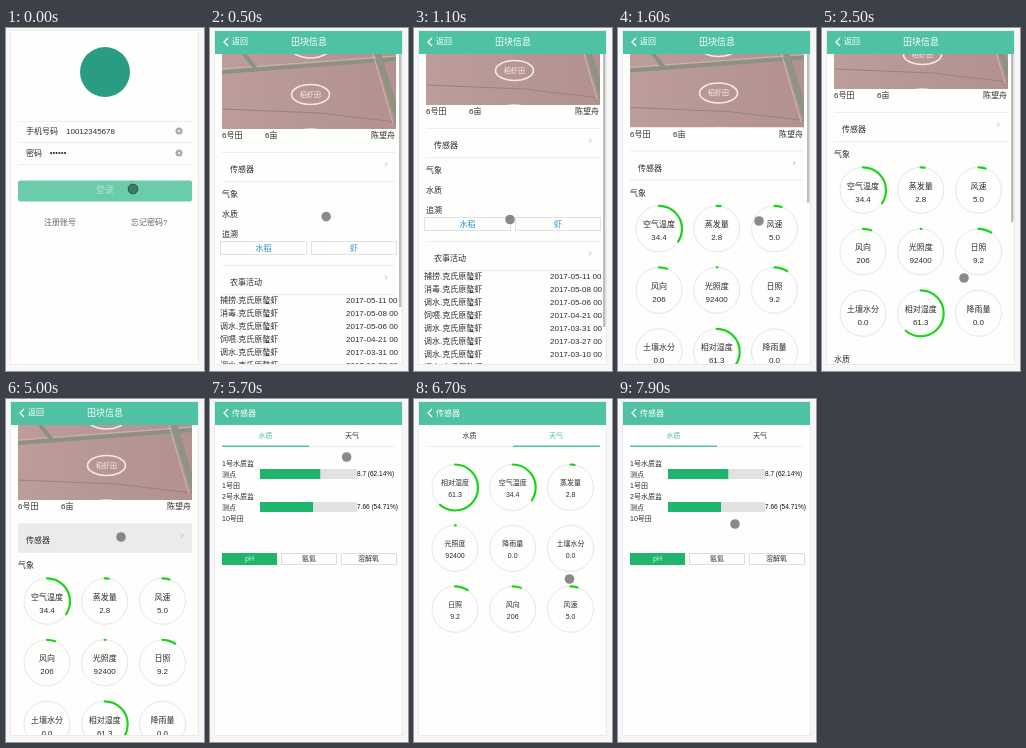
An HTML page with a canvas for the animation above (8 s loop, 198 px wide and 343 px high).

```html
<!DOCTYPE html>
<html lang="zh">
<head>
<meta charset="utf-8">
<style>
html, body { margin: 0; width: 198px; height: 343px; overflow: hidden; background: #f7f7f7; }
canvas { display: block; width: 198px; height: 343px; }
</style>
</head>
<body>
<canvas id="stage"></canvas>
<script>
const canvas = document.getElementById('stage');
const c = canvas.getContext('2d');
const dpr = window.devicePixelRatio || 1;
canvas.width = 198 * dpr;
canvas.height = 343 * dpr;

const LOOP = 8000, STEP = 100;
const TEAL = '#50c2a4', GREEN = '#1fb56c', RING = '#18d51c', INK = '#2c2c2c';
const FONT = '"Liberation Sans", "Noto Sans CJK SC", "Noto Sans CJK", sans-serif';
const COLS = [41, 98.7, 156.5];

// Keys: time, then values
const CURSOR = [
  [0, 127, 161], [300, 127, 161], [800, 100, 230], [1000, 100, 230], [1100, 96, 191.5],
  [1300, 40, 142], [1400, 40, 142], [1600, 141, 193], [2000, 142, 290], [2500, 142, 250],
  [3000, 140, 110], [3400, 140, 110], [3900, 140, 260], [4100, 115, 138], [5300, 115, 138],
  [5800, 142, 38], [6000, 142, 38], [6700, 155.5, 180], [7100, 58, 38], [7300, 58, 38],
  [7900, 117, 125]
];
const SCROLL = [
  [0, 0], [500, 0], [800, 23], [1000, 23], [1100, 24], [1300, 24], [1600, 1.5], [1800, 0],
  [2000, 0], [2500, 40], [3100, 221], [3400, 221], [4000, 0]
];
const FIELD_GAUGES = [
  ['空气温度', '34.4', 34.4], ['蒸发量', '2.8', 2.8], ['风速', '5.0', 5],
  ['风向', '206', 5.7], ['光照度', '92400', 0.5], ['日照', '9.2', 9.2],
  ['土壤水分', '0.0', 0], ['相对湿度', '61.3', 61.3], ['降雨量', '0.0', 0]
];
const SENSOR_GAUGES = [7, 0, 1, 4, 8, 6, 5, 3, 2].map(i => FIELD_GAUGES[i]);
const WORK = [
  ['捕捞', '05-11'], ['消毒', '05-08'], ['调水', '05-06'], ['饲喂', '04-21'], ['调水', '03-31'],
  ['调水', '03-27'], ['调水', '03-10'], ['调水', '03-06'], ['饲喂', '03-03'], ['调水', '03-01']
];

const clamp = v => Math.max(0, Math.min(1, v));
const ramp = (t, from, to) => clamp((t - from) / (to - from));
const easeOut = p => 1 - (1 - p) ** 2;

function sample(keys, t) {
  const i = keys.findIndex(k => k[0] > t);
  if (i < 0) return keys[keys.length - 1].slice(1);
  const a = keys[i - 1], b = keys[i], p = ramp(t, a[0], b[0]);
  return a.slice(1).map((v, n) => v + (b[n + 1] - v) * p);
}

function box(x, y, w, h, color) {
  c.fillStyle = color;
  c.fillRect(x, y, w, h);
}

function frame(x, y, w, h, color) {
  c.strokeStyle = color;
  c.lineWidth = 1;
  c.strokeRect(x + .5, y + .5, w - 1, h - 1);
}

function disc(x, y, r, color) {
  c.fillStyle = color;
  c.beginPath();
  c.arc(x, y, r, 0, 7);
  c.fill();
}

function line(color, width, ...points) {
  c.strokeStyle = color;
  c.lineWidth = width;
  c.beginPath();
  points.forEach(p => c.lineTo(...p));
  c.stroke();
}

function text(s, x, y, size = 8, color = INK, align = 'left') {
  c.font = `${size}px ${FONT}`;
  c.textAlign = align;
  c.textBaseline = 'middle';
  c.fillStyle = color;
  c.fillText(s, x, y + .5);
}

const rule = y => box(12, y, 174, 1, '#eee');

function header() {
  box(5, 3, 187, 23, TEAL);
  line('#fff', 1.2, [18, 10], [14, 14], [18, 18]);
}

function login() {
  disc(99, 44, 25, '#2a9c82');
  [93, 114, 136].forEach(rule);
  text('手机号码', 20, 103);
  text('10012345678', 60, 103);
  text('密码', 20, 125);
  for (let i = 0; i < 6; i++) disc(45 + i * 2.8, 125, 1.1, INK);
  for (const y of [103, 125]) {
    disc(173, y, 3.5, '#aaa');
    line('#fff', .8, [171.7, y - 1.3], [174.3, y + 1.3]);
    line('#fff', .8, [174.3, y - 1.3], [171.7, y + 1.3]);
  }
  c.fillStyle = '#6ccbac';
  c.beginPath();
  c.roundRect(12, 152.5, 174, 21, 2);
  c.fill();
  text('登录', 99, 162.5, 9, '#b5e3d4', 'center');
  text('注册账号', 38, 194, 8, '#666');
  text('忘记密码?', 125, 194, 8, '#666');
}

function photo(bottom) {
  c.save();
  c.beginPath();
  c.rect(12, 26, 174, bottom - 26);
  c.clip();
  const g = c.createLinearGradient(12, 0, 186, 0);
  g.addColorStop(0, '#bc9d9a');
  g.addColorStop(1, '#b29190');
  box(12, bottom - 75, 174, 75, g);
  line('#8c9180', 4, [12, bottom - 57], [186, bottom - 70]);
  line('#c6b8ae', 1, [12, bottom - 60], [186, bottom - 73]);
  line('#94857c', 1.2, [12, bottom - 20], [110, bottom - 16], [186, bottom - 7]);
  line('#8c9180', 4, [34, bottom - 75], [46, bottom - 60]);
  line('#8f9382', 6, [168, bottom - 75], [188, bottom - 10]);
  line('#c9bbb1', 1, [163, bottom - 75], [183, bottom - 6]);
  for (const y of [bottom - 81, bottom - 34.5, bottom + 10]) {
    c.strokeStyle = '#f3ece6';
    c.lineWidth = 1.6;
    c.beginPath();
    c.ellipse(100.5, y, 19, 10, 0, 0, 7);
    c.stroke();
    text('稻虾田', 100.5, y, 7, '#f3ece6', 'center');
  }
  c.restore();
}

function gauge([label, value, percent], x, y, size, p) {
  c.strokeStyle = '#e6e6e6';
  c.lineWidth = 1;
  c.beginPath();
  c.arc(x, y, 23, 0, 7);
  c.stroke();
  if (percent) {
    c.strokeStyle = RING;
    c.lineWidth = 2.2;
    c.lineCap = 'round';
    c.beginPath();
    c.arc(x, y, 23, -Math.PI / 2, (percent * p / 50 - .5) * Math.PI);
    c.stroke();
    c.lineCap = 'butt';
  }
  text(label, x, y - 4.5, size, INK, 'center');
  text(value, x, y + (size > 7 ? 8.5 : 7), size, INK, 'center');
}

function gauges(list, top, pitch, size, p) {
  list.forEach((g, i) => gauge(g, COLS[i % 3], top + Math.floor(i / 3) * pitch, size, p));
}

function linkRow(label, top, pressed) {
  if (pressed) box(12, top, 174, 29, '#ebebeb');
  rule(top);
  rule(top + 29);
  text(label, 20, top + 17.7);
  line('#aaa', .8, [175, top + 10.5], [177, top + 12.5], [175, top + 14.5]);
}

function field(t) {
  const scroll = sample(SCROLL, t)[0], y = 101 - scroll;
  const open = t >= 1400;
  if (y > 26) photo(y);
  text('6号田', 12, y + 6.5);
  text('6亩', 55, y + 6.5);
  text('陈望舟', 185, y + 6.5, 8, INK, 'right');
  linkRow('传感器', y + 23, t >= 5000);
  text('气象', 12, y + 65.5);
  if (open) gauges(FIELD_GAUGES, y + 101.3, 61.5, 8, easeOut(ramp(t, 1300, 1600)));

  const low = y + (open ? 185 : 0);
  text('水质', 12, low + 85);
  text('追溯', 12, low + 105.5);
  [['水稻', 10, 87], ['虾', 101, 86]].forEach(([s, x, w]) => {
    frame(x, Math.round(low + 112), w, 14, '#e2e2e2');
    text(s, x + w / 2, low + 119, 8, '#2490c8', 'center');
  });
  linkRow('农事活动', low + 136);
  WORK.forEach(([job, day], i) => {
    const row = low + 171.5 + i * 13;
    text(job + '.克氏原螯虾', 10, row);
    text(`2017-${day} 00`, 136, row);
  });

  // The top of the scroll bar stays beneath the header
  if (t < 4200) {
    const ratio = open ? .513 : .829;
    box(189, 3 + scroll * ratio, 2.5, 333 * ratio, '#bdbdbd');
  }
  header();
  text('返回', 22, 13.5, 8, '#fff');
  text('田块信息', 99, 13.7, 9, '#fff', 'center');
}

function waterRow(i, place, value, percent) {
  const y = 65 + i * 33;
  text(`${i + 1}号水质监`, 12, y, 7);
  text('测点', 12, y + 11, 7);
  text(place, 12, y + 22, 7);
  box(50, y + 5, 97, 10, '#e2e2e2');
  box(50, y + 5, .97 * percent, 10, GREEN);
  text(`${value} (${percent}%)`, 147, y + 10, 6.5, '#111');
}

function sensor(t) {
  const weather = t >= 6000 && t < 7300;
  header();
  text('传感器', 22, 14, 8, '#fff');
  rule(47);
  box(weather ? 99 : 12, 46.5, 87, 1.5, TEAL);
  text('水质', 55.5, 37, 7, weather ? '#333' : TEAL, 'center');
  text('天气', 142, 37, 7, weather ? TEAL : '#333', 'center');
  if (weather) {
    gauges(SENSOR_GAUGES, 88.5, 60.9, 7, easeOut(ramp(t, 5900, 6300)));
    return;
  }
  waterRow(0, '1号田', '8.7', 62.14);
  waterRow(1, '10号田', '7.66', 54.71);
  ['pH', '氨氮', '溶解氧'].forEach((s, i) => {
    const x = 12 + i * 59.5;
    if (i) frame(Math.floor(x), 154, 56, 12, '#dedede');
    else box(x, 154, 55, 12, GREEN);
    text(s, x + 27.5, 160, 7, i ? INK : '#d9f5e6', 'center');
  });
}

function page(draw, t, offset) {
  c.save();
  c.translate(offset, 0);
  box(5, 3, 187, 333, '#fefefd');
  draw(t);
  c.restore();
}

function cursor(t) {
  const [x, y] = sample(CURSOR, t), pressed = t < 300;
  disc(x, y, 4.8, pressed ? '#3f7a66' : 'rgba(105,105,105,.78)');
  if (!pressed) return;
  c.strokeStyle = '#2f4d43';
  c.lineWidth = 1;
  c.stroke();
}

function render(t) {
  c.setTransform(dpr, 0, 0, dpr, 0, 0);
  box(0, 0, 198, 343, '#f7f7f7');
  frame(4, 2, 189, 335, '#ebebeb');
  c.save();
  c.beginPath();
  c.rect(5, 3, 187, 333);
  c.clip();
  const views = [[login, 0], [field, 200], [sensor, 5100]];
  views.forEach(([draw, start], i) => {
    if (i && t <= start) return;
    page(draw, t, i ? 187 * (1 - easeOut(ramp(t, start, start + 300))) : 0);
  });
  c.restore();
  cursor(t);
}

function tick() {
  render(Math.floor(performance.now() % LOOP / STEP) * STEP);
  requestAnimationFrame(tick);
}
tick();
</script>
</body>
</html>
```
